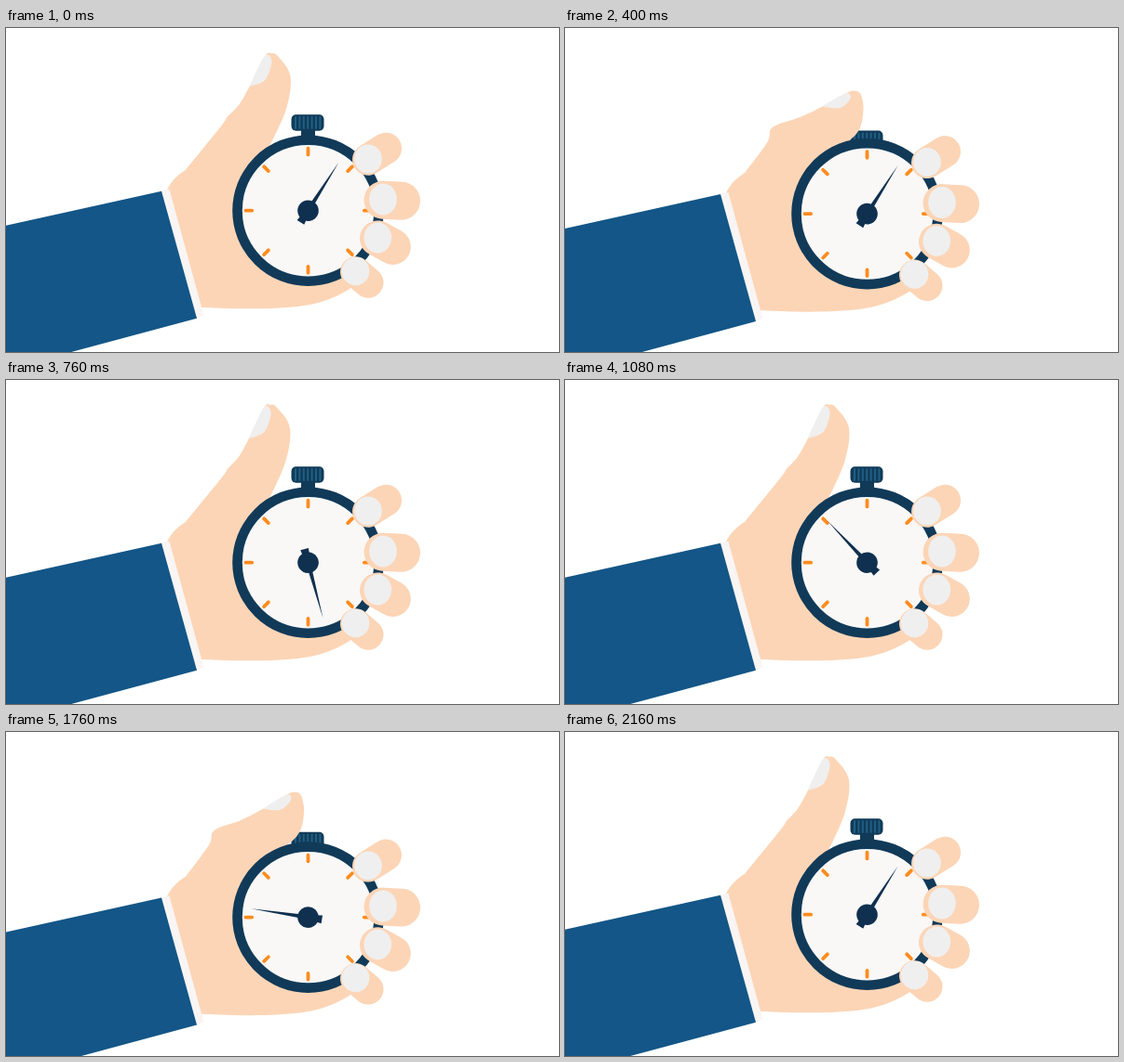
Recreate the animation shown at these times as an HTML page. Size 594 by 349 pixels, loop 3.84 s.

```html
<!DOCTYPE html>
<html lang="en">
<head>
<meta charset="utf-8">
<title>Stopwatch</title>
<style>
  html, body { margin: 0; width: 100%; height: 100%; overflow: hidden; background: #fff; }
  svg { display: block; width: 594px; height: 349px; }
  .skin { fill: #fcd5b6; }
  .nail { fill: #efefef; }
  .navy { fill: #113a58; }
  #fingers path { stroke: #fcd5b6; stroke-linecap: round; }
  #stripes { stroke: #1f5f83; stroke-width: 2; }
  #ticks { stroke: #ff8c1e; stroke-width: 3.8; stroke-linecap: round; }
</style>
</head>
<body>
<svg viewBox="0 -0.7 594 349">
  <g id="arm">
    <path class="skin" d="M170 180C175 167 182 159 193 152L284 126L385 200L374 277C358 288 341 295 322 298C290 303 245 302 205 300Z"/>
    <path fill="#f9f5f4" d="M165 175L175.500 173L212.500 309L204 312Z"/>
    <path fill="#135687" d="M-40 220.800L167 175L205 312L-40 378Z"/>
    <g id="crown" class="navy">
      <rect x="317" y="106" width="15" height="24"/>
      <rect x="306.500" y="92.500" width="35" height="17.500" rx="5"/>
      <g id="stripes"></g>
    </g>
    <path id="thumb" class="skin"/>
    <path id="thumbNail" class="nail"/>
    <g transform="translate(324.500 196)">
      <circle r="76" fill="#f9f8f7" stroke="#113a58" stroke-width="10.600"/>
      <g id="ticks"></g>
      <g id="needle" fill="#10304f">
        <path d="M0 -62L2.500 0L4.500 15H-4.500L-2.500 0Z"/>
        <circle r="11.300"/>
      </g>
    </g>
    <g id="fingers"></g>
  </g>
</svg>
<script>
const $ = id => document.getElementById(id);
const LOOP = 3840, STEP = 40, SECOND_PRESS = 1450;
const clamp = (v, lo, hi) => Math.min(hi, Math.max(lo, v));
const ease = u => (1 - Math.cos(Math.PI * clamp(u, 0, 1))) / 2;
const lerp = (a, b, u) => a + (b - a) * u;
const between = (a, b, u) => a.map((v, k) => lerp(v, b[k], u));
const repeat = (n, draw) => Array.from({ length: n }, (_, i) => draw(i)).join('');

// Smooth path through points (Catmull-Rom)
function smooth(pts) {
  const at = i => pts[clamp(i, 0, pts.length - 1)];
  const toward = (p, from, to) => p.map((v, k) => v + (to[k] - from[k]) / 6);
  return `M${pts[0]}` + pts.slice(1).map((p, i) =>
    `C${toward(at(i), at(i - 1), p)} ${toward(p, at(i + 2), at(i))} ${p}`).join('') + 'Z';
}

// Each finger is a capsule from its nail to its tip
const fingers = [
  { nail: [389, 141], tip: [408, 129], r: 17 },
  { nail: [405, 184.5], tip: [424.5, 185.5], r: 20.5 },
  { nail: [399.3, 226], tip: [415.5, 235], r: 19.3 },
  { nail: [375.5, 262], tip: [389, 273.5], r: 16.5 }
];
$('fingers').innerHTML = fingers.map(({ nail: [x, y], tip, r }) =>
  `<path d="M${x} ${y}L${tip}" stroke-width="${2 * r}"/>` +
  `<ellipse class="nail" cx="${x}" cy="${y - .7}" rx="14.8" ry="${8 + .44 * r}"/>`).join('');

$('ticks').innerHTML = repeat(8, i => `<path d="M0 -60.3V-67" transform="rotate(${i * 45})"/>`);
$('stripes').innerHTML = repeat(7, i => `<path d="M${311 + i * 4.4} 94.5V108"/>`);

// Thumb landmarks swing around the joint from rest to pressed
const WRIST = [193, 152], JOINT = [255, 95], THUMB_BASE = [280, 133];
const landmarks = {
  knuckle: [[232, 104], [218, 118]],
  ridge: [[238, 95], [224, 102]],
  bend: [[250, 82], [253, 91]],
  nailRoot: [[261, 62], [276, 79]],
  nailEnd: [[277, 29], [301, 64]],
  tip: [[284, 26], [310, 61]],
  pad: [[291, 29], [317, 65]],
  front: [[305, 51], [320, 84]],
  belly: [[300, 88], [312, 109]]
};

function swing([rest, pressed], u) {
  const polar = ([x, y]) => {
    const dx = x - JOINT[0], dy = y - JOINT[1];
    return [Math.atan2(dx, -dy), Math.hypot(dx, dy)];
  };
  const [angle, r] = between(polar(rest), polar(pressed), u);
  return [JOINT[0] + r * Math.sin(angle), JOINT[1] - r * Math.cos(angle)];
}

function drawThumb(press) {
  const at = {};
  for (const name in landmarks) at[name] = swing(landmarks[name], press / .93);
  $('thumb').setAttribute('d', smooth([WRIST, ...Object.values(at), THUMB_BASE]));

  const corner = between(at.nailEnd, at.front, .27);
  const curve = between(between(corner, at.nailRoot, .5), at.belly, .17);
  $('thumbNail').setAttribute('d', smooth([at.nailRoot, at.nailEnd, corner, curve, at.nailRoot]));
}

// Rises from start to peak and falls back by end, once for each press
const pulse = (t, start, peak, end) =>
  t < peak ? ease((t - start) / (peak - start)) : ease((end - t) / (end - peak));
const presses = (t, ...times) => Math.max(pulse(t, ...times), pulse(t - SECOND_PRESS, ...times));

function draw(t) {
  const press = presses(t, -40, 380, 700);
  const dip = 3.4 * presses(t, 40, 400, 710);
  const sink = clamp((press - .74) * 60, 0, 14);
  const spin = 32.4 + 720 * clamp((t - 480) / 1520, 0, 1);

  drawThumb(press);
  $('arm').setAttribute('transform', `translate(0 ${dip})`);
  $('crown').setAttribute('transform', `translate(0 ${sink})`);
  $('needle').setAttribute('transform', `rotate(${spin})`);
}

const begin = performance.now();
function frame() {
  const t = (performance.now() - begin) % LOOP;
  draw(Math.floor(t / STEP) * STEP);
  requestAnimationFrame(frame);
}
draw(0);
requestAnimationFrame(frame);
</script>
</body>
</html>
```
